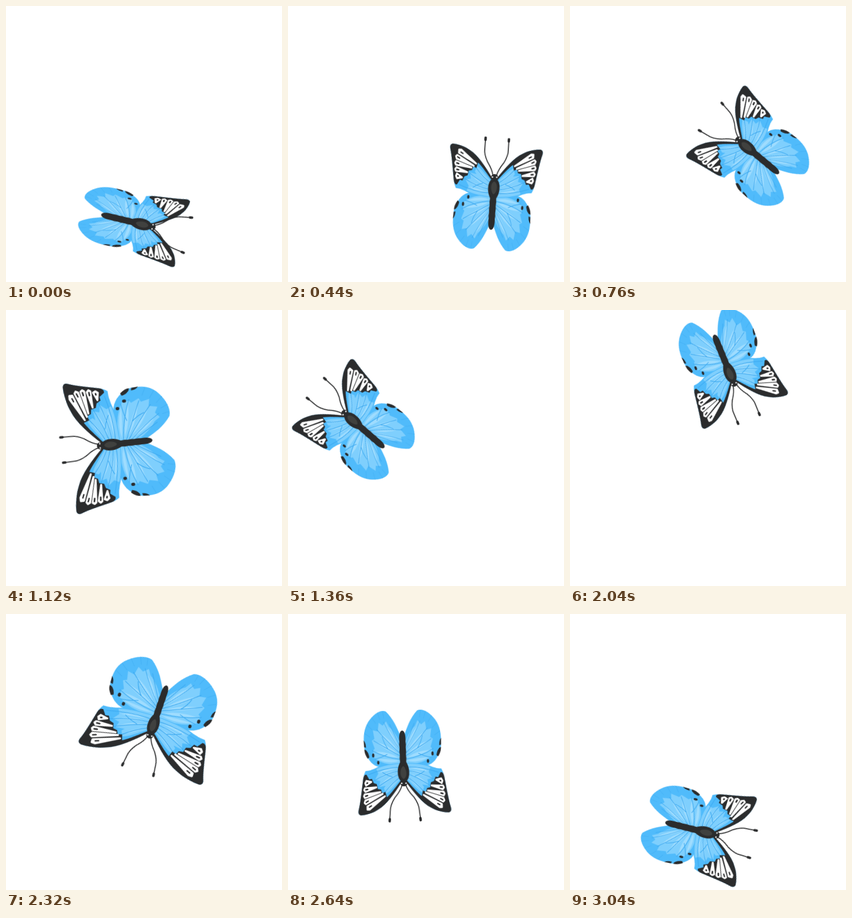
Animation of 450 by 450 pixels, one loop 3080 ms. Source, as an HTML page without scripts:

```html
<!DOCTYPE html>
<html lang="en">
<head>
<meta charset="utf-8">
<title>Butterfly</title>
<style>
  @property --n { syntax: "<number>"; inherits: true; initial-value: 0; }

  html, body { margin: 0; width: 100%; height: 100%; overflow: hidden; background: #fff; }
  svg { display: block; width: 100vw; height: 100vh; }

  /* --n counts the 77 ticks of a loop; wings and antennae derive from it */
  .fly {
    --blue: #50bbfb;
    --pale: #7fcffd;
    --light: #9fdcfe;
    --vein: #3ca9f0;
    --ink: #2b2c2d;
    animation: tick 3.08s steps(77) -4ms infinite, path 3.08s -4ms infinite;
  }
  .wings { transform: scaleX(calc(.792 - .262 * cos(var(--n) * 72deg))); }
  .feeler {
    transform-origin: 3px -44px;
    transform: rotate(calc(5.2deg * cos(var(--n) * 17.56deg)));
  }

  .blue { fill: var(--blue); }
  .pale { fill: var(--pale); }
  .ink { fill: var(--ink); }
  .vein { fill: none; stroke: var(--vein); stroke-width: 1.1; stroke-linecap: round; }
  .light { fill: var(--light); }
  .cell { fill: #fff; stroke: #fff; stroke-width: 3; stroke-linejoin: round; }
  .line { fill: none; stroke: var(--ink); stroke-width: 1.6; stroke-linecap: round; }
  .drop { stroke-width: 2.4; }
  .club { stroke-width: 4; }

  @keyframes tick { from { --n: 0; } to { --n: 77; } }

  @keyframes path {
    0%      { transform: translate(199px, 350.5px) rotate(103.4deg); animation-timing-function: steps(4); }
    5.195%  { transform: translate(250px, 363px) rotate(78deg); animation-timing-function: steps(4); }
    10.39%  { transform: translate(304px, 352px) rotate(40deg); animation-timing-function: steps(3); }
    14.286% { transform: translate(334px, 320px) rotate(4deg); animation-timing-function: steps(3); }
    18.182% { transform: translate(334px, 279px) rotate(-15deg); animation-timing-function: steps(4); }
    23.377% { transform: translate(315px, 249px) rotate(-43deg); animation-timing-function: steps(4); }
    28.571% { transform: translate(279px, 231px) rotate(-72deg); animation-timing-function: steps(6); }
    36.364% { transform: translate(194px, 217px) rotate(-96.3deg); animation-timing-function: steps(4); }
    41.558% { transform: translate(143px, 212px) rotate(-76deg); animation-timing-function: steps(4); }
    46.753% { transform: translate(103px, 178px) rotate(-22deg); animation-timing-function: steps(5); }
    53.247% { transform: translate(125.5px, 117.5px) rotate(62deg); animation-timing-function: steps(3); }
    57.143% { transform: translate(160px, 93px) rotate(76deg); animation-timing-function: steps(4); }
    62.338% { transform: translate(218px, 68px) rotate(116deg); animation-timing-function: steps(3); }
    66.234% { transform: translate(252px, 82px) rotate(157.6deg); animation-timing-function: steps(5); }
    72.727% { transform: translate(260px, 138px) rotate(190deg); animation-timing-function: steps(5); }
    79.221% { transform: translate(229px, 191px) rotate(212deg); animation-timing-function: steps(5); }
    85.714% { transform: translate(187.5px, 235px) rotate(178deg); animation-timing-function: steps(4); }
    90.909% { transform: translate(185px, 287px) rotate(161deg); animation-timing-function: steps(3); }
    94.805% { transform: translate(187px, 322px) rotate(137deg); animation-timing-function: steps(3); }
    98.701%, 100% { transform: translate(199px, 350.5px) rotate(104deg); }
  }
</style>
</head>
<body>
<svg viewBox="0 0 450 450">
  <defs>
    <g id="wing">
      <!-- hind wing -->
      <path class="blue" d="M3-12C25-14 45-15 60-12C72-9 84 2 88 18C90 39 87 50 77 61C65 73 48 81 36 77C20 66 10 48 3 34Z"/>
      <path class="pale" d="M4-9C25-11 48-9 66 2L68 14 64 17 70 30 64 33 67 47 56 45 53 59 44 54 36 61 30 52C20 46 10 34 4 22Z"/>
      <path class="light" d="M8-4Q34-10 58 0Q34 0 8-4ZM10 1Q38 2 62 12Q34 12 10 1ZM10 6Q36 12 62 28Q30 22 10 6ZM9 9Q30 20 54 44Q26 32 9 9ZM8 14Q24 28 36 52Q18 38 8 14Z"/>
      <path class="vein" d="M5-2C25 0 48 4 70 14M5 3C25 12 45 20 66 30M5 7C22 18 42 34 58 48M5 12C18 26 32 44 42 60M5 18C14 32 22 46 28 56M36 7C46 3 56 1 64 0M34 16C40 22 44 30 46 36"/>
      <path class="vein" opacity=".5" d="M74 36L86 42M69 48L80 56M60 58L69 68M50 64L55 75M41 66L43 76"/>
      <path class="ink" d="M77 3L81 1Q88 9 88 16L84 15Q78 10 77 3ZM84 19L88 20 89 31Q84 27 84 19Z"/>
      <ellipse class="ink" cx="57" cy="-6" rx="2.6" ry="3"/>
      <ellipse class="ink" cx="68" cy="6" rx="2.6" ry="3.2"/>

      <!-- fore wing -->
      <path class="blue" d="M4-37C23-58 42-75 60-82C72-88 92-91 101-91Q108-90 106-83C101-70 98-54 93-32Q91-24 87-19C77-19 67-16 58-13C44-10 20-8 3-8Z"/>
      <path class="pale" d="M5-32C20-44 32-54 42-57L46-48 42-44 57-46 54-36 66-34 58-24 62-16C46-11 20-9 4-9Z"/>
      <path class="light" d="M10-31Q26-46 42-52Q30-40 10-31ZM11-26Q34-34 54-43Q36-28 11-26ZM12-21Q38-27 60-33Q36-19 12-21ZM12-16Q36-20 56-23Q36-12 12-16Z"/>
      <path class="vein" d="M6-30C20-36 34-46 46-56M6-25C24-29 44-38 60-46M6-20C28-22 50-28 70-36M6-15C30-14 54-18 80-25M26-30C34-28 42-26 48-22"/>
      <path class="ink" d="M4-38C23-58 42-75 60-82C72-88 92-91 101-91Q108-90 106-83C101-70 98-54 93-32Q91-24 85-25L79-33 73-32 69-39 62-41 60-49 53-50 50-56 43-54 40-63C30-57 17-45 5-35Z"/>
      <path class="cell" d="M44-61L80-82 86-82 86-77ZM49-57L89-73 92-71 90-67ZM54-54L91-63 93-60 91-57ZM63-46L89-53 92-50 90-47ZM74-37L87-43 89-39 86-35Z"/>
      <path class="line drop" d="M76-76L81-78M83-68L88-70M84-59L89-60M83-49L88-49.500M83-38.500L85-39"/>
    </g>
    <g id="feeler" class="feeler">
      <path class="line" d="M3-44C6-54 10-58 15-64C21-73 23-80 23-86L24.300-102"/>
      <path class="line club" d="M24-99L24.300-102.500"/>
    </g>
  </defs>

  <g class="fly">
    <g class="wings">
      <use href="#wing"/>
      <use href="#wing" transform="scale(-1 1)"/>
    </g>
    <use href="#feeler"/>
    <use href="#feeler" transform="scale(-1 1)"/>
    <path class="ink" d="M0-46C5-46 7-42 5-37C9-33 10-25 9-18C8-12 6-9 5-6Q6 0 5 5Q6 11 5 16Q6 22 5 27C6 36 4 45 0 45C-4 45-6 36-5 27Q-6 22-5 16Q-6 11-5 5Q-6 0-5-6C-6-9-8-12-9-18C-10-25-9-33-5-37C-7-42-5-46 0-46Z"/>
    <path d="M0-34C5-32 6-24 4-18Q0-9-3-17C-6-24-5-32 0-34Z" fill="#40413f"/>
    <circle cx="-3.500" cy="-41" r="1.200" fill="#fff"/>
    <circle cx="3.500" cy="-41" r="1.200" fill="#fff"/>
  </g>
</svg>
</body>
</html>
```
